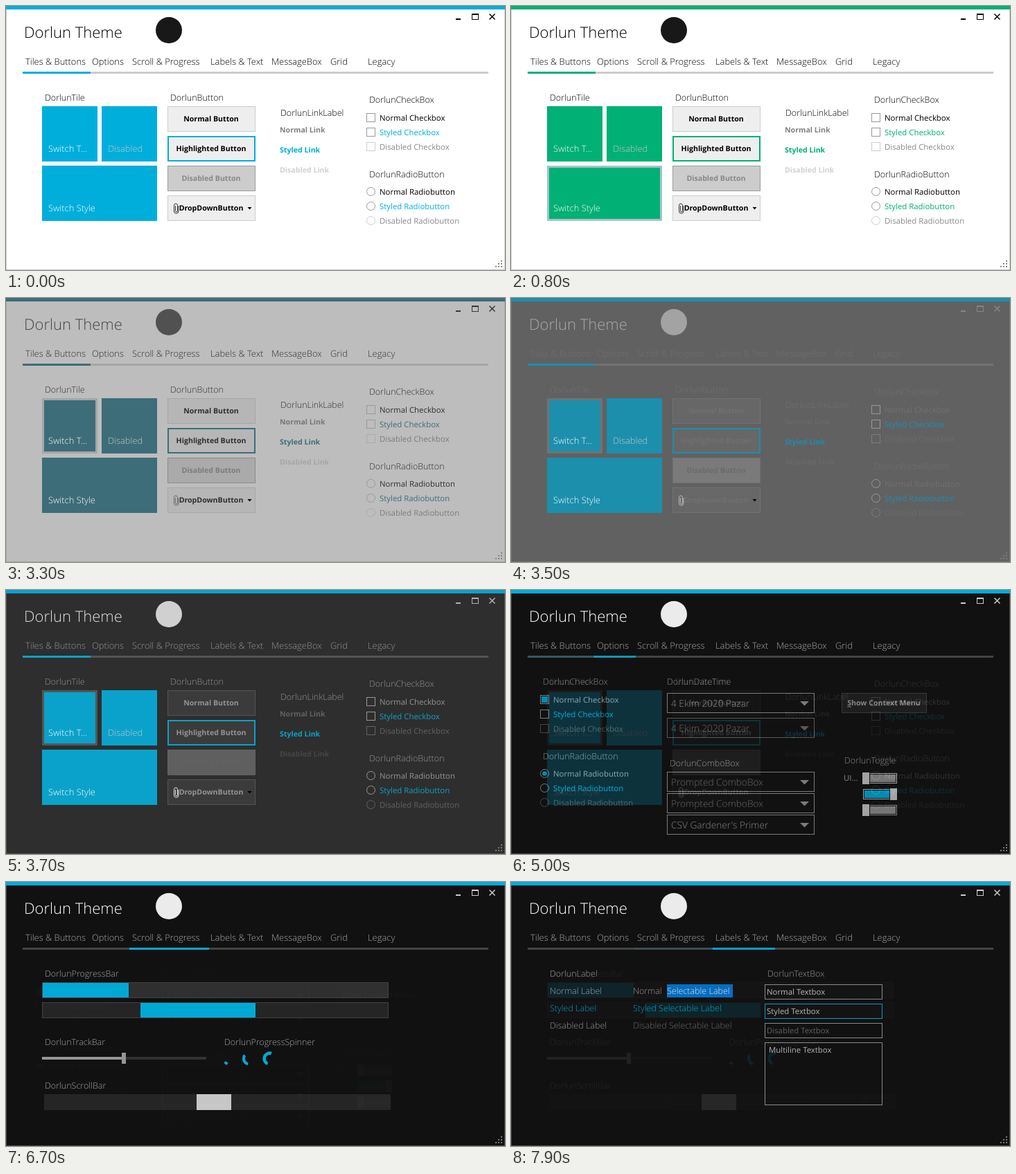
An HTML page for the animation above (8 s loop, 720 px wide and 382 px high).

```html
<!DOCTYPE html>
<html lang="en">
<head>
<meta charset="utf-8">
<title>Theme demo</title>
<style>
html, body { margin: 0; width: 100%; height: 100%; overflow: hidden; }
svg { display: block; width: 720px; height: 382px; }
text { font-family: "Open Sans", "Noto Sans", sans-serif; white-space: pre; text-rendering: geometricPrecision; }
</style>
</head>
<body>
<svg id="stage" viewBox="0 0 720 382"></svg>
<script>
const NAME = 'Dorlun';
const BLUE = '#00aedb', GREEN = '#00b159', SILVER = '#555';
const gray = v => `rgb(${v},${v},${v})`;

const LIGHT = {
  bg: gray(255), title: gray(0), text: gray(0), line: gray(204), logo: gray(24), icon: gray(0),
  grip: gray(140), button: gray(238), edge: gray(204), buttonText: gray(0),
  offFill: gray(204), offEdge: gray(155), offText: gray(136),
  link: gray(128), offLink: gray(209), box: gray(153), offBox: gray(204), clip: gray(50)
};
const DARK = {
  bg: gray(17), title: gray(255), text: gray(170), line: gray(68), logo: gray(235), icon: gray(204),
  grip: gray(120), button: gray(34), edge: gray(68), buttonText: gray(170),
  offFill: gray(80), offEdge: gray(93), offText: gray(93),
  link: gray(93), offLink: gray(51), box: gray(153), offBox: gray(85), clip: gray(255)
};

// y is the middle of the capital letters
function text(x, y, s, fill, size = 12.5, weight = 350, extra = '') {
  return `<text x="${x}" y="${y + size * .357}" fill="${fill}" style="font-size:${size}px;font-weight:${weight}" ${extra}>${s}</text>`;
}
const small = (x, y, s, fill) => text(x, y, s, fill, 11.4, 400);
const large = (x, y, s, fill) => text(x, y, s, fill, 12.9);
const bold = (x, y, s, fill, extra) => text(x, y, s, fill, 10.6, 700, extra);
const rect = (x, y, w, h, fill) => `<rect x="${x}" y="${y}" width="${w}" height="${h}" fill="${fill}"/>`;
const path = (d, stroke, width = 1) => `<path d="${d}" fill="none" stroke="${stroke}" stroke-width="${width}"/>`;
const shape = (d, fill) => `<path d="${d}" fill="${fill}"/>`;

// filled rectangle with the border inside its bounds
function frame(x, y, w, h, fill, stroke, b = 1) {
  return `<rect x="${x + b / 2}" y="${y + b / 2}" width="${w - b}" height="${h - b}" fill="${fill}" stroke="${stroke}" stroke-width="${b}"/>`;
}

function choices(c, accent, x, y, kind, on) {
  return ['Normal', 'Styled', 'Disabled'].map((word, i) => {
    const cy = y + i * 21.2, edge = i == 2 ? c.offBox : c.box, round = kind == 'Radiobutton';
    const top = Math.round(cy - 6.5), mid = top + 6.5, marked = on && !i;
    const mark = round
      ? `<circle cx="${x + 6.5}" cy="${mid}" r="6" fill="none" stroke="${edge}"/>` +
        (marked ? `<circle cx="${x + 6.5}" cy="${mid}" r="3.3" fill="${accent}"/>` : '')
      : frame(x, top, 13, 13, 'none', edge) + (marked ? rect(x + 2, top + 2, 9, 9, accent) : '');
    return mark + small(x + 19, cy, word + ' ' + kind, [c.text, accent, c.offText][i]);
  }).join('');
}

function buttonsPage(c, accent, hover) {
  const tile = (x, y, w, s, fill) =>
    rect(x, y, w, 80, accent) +
    (hover == s ? frame(x, y, w, 80, 'none', c.edge, 3) : '') +
    large(x + 9, y + 61, s, fill);
  const button = (y, s, fill, edge, color, b) =>
    frame(233, y, 127, 37, fill, edge, b) + bold(296, y + 18.5, s, color, 'text-anchor="middle"');
  return text(56, 133, NAME + 'Tile', c.text) +
    tile(52, 145, 80, 'Switch T...', '#fff') +
    tile(138, 145, 80, 'Disabled', gray(200)) +
    tile(52, 231, 166, 'Switch Style', '#fff') +
    text(237, 133, NAME + 'Button', c.text) +
    button(145, 'Normal Button', c.button, c.edge, c.buttonText) +
    button(188, 'Highlighted Button', c.button, accent, c.buttonText, 2) +
    button(231, 'Disabled Button', c.offFill, c.offEdge, c.offText) +
    button(274, 'DropDownButton', c.button, c.edge, c.buttonText) +
    shape('M348.5 291h6l-3 3.5z', '#000') +
    path('M244.5 289v7.5a1.5 1.5 0 0 0 3 0v-8a2.5 2.5 0 0 0-5 0v8.5a3.2 3.2 0 0 0 6.4 0v-8', c.clip) +
    text(396, 155, NAME + 'LinkLabel', c.text) +
    bold(395, 179, 'Normal Link', c.link) +
    bold(395, 208, 'Styled Link', accent) +
    bold(395, 237, 'Disabled Link', c.offLink) +
    text(524, 136, NAME + 'CheckBox', c.text) +
    choices(c, accent, 520, 161.5, 'Checkbox') +
    text(524, 244, NAME + 'RadioButton', c.text) +
    choices(c, accent, 520, 268.5, 'Radiobutton');
}

function optionsPage(c, accent) {
  const combo = (y, s, fill, edge = c.box) =>
    frame(225, y, 213, 29, c.bg, edge) + text(231, y + 15, s, fill, 13.7) +
    shape(`M417 ${y + 12}h13l-6.5 6.5z`, edge);
  const toggle = (y, fill, edge, on) =>
    frame(508, y + 1, 49, 15, c.bg, edge) + rect(510, y + 3, 45, 11, fill) +
    rect(on ? 546 : 507, y, 11, 17, c.bg) + rect(on ? 547 : 507, y, 10, 17, gray(204));
  return text(46, 133, NAME + 'CheckBox', c.text) +
    choices(c, accent, 42, 158.5, 'Checkbox', true) +
    text(46, 241, NAME + 'RadioButton', c.text) +
    choices(c, accent, 42, 265.5, 'Radiobutton', true) +
    text(225, 133, NAME + 'DateTime', c.text) +
    combo(149, '4 Ekim 2020 Pazar', c.text) +
    combo(185, '4 Ekim 2020 Pazar', gray(125), gray(109)) +
    text(229, 251, NAME + 'ComboBox', c.text) +
    combo(263, 'Prompted ComboBox', gray(120)) +
    combo(294, 'Prompted ComboBox', gray(120)) +
    combo(325, "CSV Gardener's Primer", c.text) +
    frame(477, 149, 123, 29, c.button, c.edge) +
    bold(538, 163.5, '<tspan text-decoration="underline">S</tspan>how Context Menu', c.buttonText, 'text-anchor="middle"') +
    text(481, 247, NAME + 'Toggle', c.text) +
    small(480, 272, 'UI...', c.text) +
    toggle(264, gray(145), gray(204)) +
    toggle(287, accent, gray(204), true) +
    toggle(310, gray(145), c.box);
}

function scrollPage(c, accent) {
  return text(56, 133, NAME + 'ProgressBar', c.text) +
    frame(52, 145, 500, 23, gray(48), c.edge) + rect(53, 146, 124, 21, accent) +
    frame(52, 174, 500, 23, gray(38), c.edge) + rect(194, 175, 166, 21, accent) +
    text(56, 232, NAME + 'TrackBar', c.text) +
    rect(52, 253, 115, 4, c.box) + rect(173, 253, 116, 4, gray(51)) + rect(167, 247, 6, 16, c.box) +
    text(315, 232, NAME + 'ProgressSpinner', c.text) +
    path('M315.5 260.5l4 3', accent, 3.5) +
    path('M344.5 250.5a8.5 8.5 0 0 0 4.5 13', accent, 4) +
    path('M383 248a8 8 0 0 0-5.5 15', accent, 4.5) +
    text(56, 295, NAME + 'ScrollBar', c.text) +
    rect(55, 307, 500, 23, gray(38)) + rect(275, 307, 50, 23, gray(204));
}

function labelsPage(c, accent) {
  const field = (y, h, edge) => frame(366, y, 170, h, c.bg, edge);
  return text(56, 133, NAME + 'Label', c.text) +
    text(56, 158, 'Normal Label', c.text) +
    text(56, 183, 'Styled Label', accent) +
    text(56, 208, 'Disabled Label', c.text) +
    text(176, 158, 'Normal', c.text) +
    rect(225, 148, 95, 19, '#0078d7') + text(225, 158, 'Selectable Label', '#fff') +
    text(176, 183, 'Styled Selectable Label', accent) +
    text(176, 208, 'Disabled Selectable Label', gray(120)) +
    text(370, 133, NAME + 'TextBox', c.text) +
    field(148, 22, c.box) + small(369, 159, 'Normal Textbox', gray(204)) +
    field(176, 22, accent) + small(369, 187, 'Styled Textbox', gray(204)) +
    field(204, 22, c.box) + small(369, 215, 'Disabled Textbox', gray(109)) +
    field(232, 91, c.box) + small(372, 243, 'Multiline Textbox', gray(204));
}

const TABS = [[28, 'Tiles &amp; Buttons'], [124, 'Options'], [182, 'Scroll &amp; Progress'],
  [295, 'Labels &amp; Text'], [383, 'MessageBox'], [468, 'Grid'], [522, 'Legacy']];
const MARKS = [[24, 98], [120, 60], [178, 115], [291, 90]];
const PAGES = [buttonsPage, optionsPage, scrollPage, labelsPage];

function windowView({ theme: c, accent, page = 0, hover }) {
  let grip = '';
  for (let row = 0; row < 3; row++)
    for (let col = 2 - row; col < 3; col++) grip += rect(706 + col * 4, 368 + row * 4, 2, 2, c.grip);
  const [x, w] = MARKS[page];
  return frame(0, 0, 720, 382, c.bg, c.line) + rect(0, 0, 720, 5, accent) +
    text(26, 38, NAME + ' Theme', c.title, 22, 300) +
    `<circle cx="235" cy="35" r="19" fill="${c.logo}"/>` +
    rect(649, 18, 7, 2, c.icon) +
    frame(672, 11, 10, 9, 'none', c.icon) + rect(672, 11, 10, 2, c.icon) +
    path('M697.5 11.5l8 8m0-8l-8 8', c.icon, 1.5) +
    rect(24, 95, 672, 3, c.line) + rect(x, 95, w, 3, accent) +
    TABS.map(([tx, s]) => large(tx, 80, s, c.text)).join('') +
    PAGES[page](c, accent, hover) + grip;
}

// each view fades in over the ones before; "steps" limits how far the fade gets
const VIEWS = [
  { theme: LIGHT, accent: BLUE },
  { start: 500, theme: LIGHT, accent: GREEN, hover: 'Switch Style' },
  { start: 1900, theme: LIGHT, accent: SILVER, hover: 'Switch T...' },
  { start: 3300, theme: DARK, accent: BLUE, hover: 'Switch T...' },
  { start: 4700, theme: DARK, accent: BLUE, page: 1 },
  { start: 6100, theme: DARK, accent: BLUE, page: 2, steps: 7 },
  { start: 7500, theme: DARK, accent: BLUE, page: 3 }
];
const LOOP = 8000, TICK = 100;
const stage = document.getElementById('stage');
stage.innerHTML = VIEWS.map(v => `<g>${windowView(v)}</g>`).join('');

function draw(now) {
  const t = now % LOOP;
  VIEWS.forEach(({ start, steps = 10 }, i) => {
    if (!i) return;
    const step = Math.max(0, Math.min(steps, Math.floor((t - start) / TICK) + 1));
    stage.children[i].setAttribute('opacity', 1 - (1 - step / 10) ** 3);
  });
  requestAnimationFrame(draw);
}
draw(0);
</script>
</body>
</html>
```
